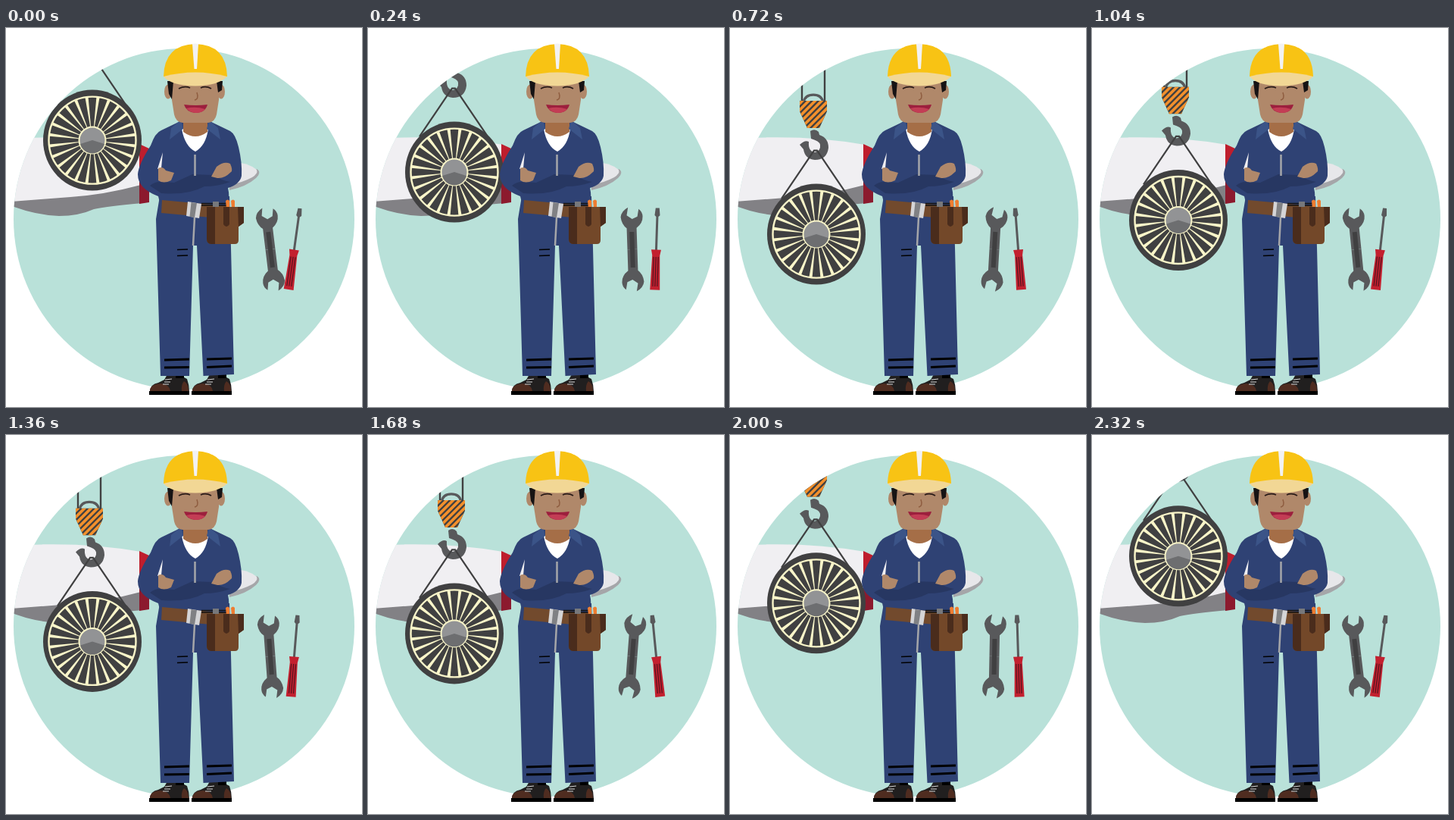
Recreate the animation shown at these times as an HTML page. Size 470 px wide and 500 px high, loop 2.4 s.

```html
<!DOCTYPE html>
<html lang="en">
<head>
<meta charset="utf-8">
<title>Aircraft mechanic</title>
<style>
html, body { margin: 0; width: 100%; height: 100%; overflow: hidden; background: #fff; }
svg { display: block; width: 100%; height: 100%; }
</style>
</head>
<body>
<svg viewBox="0 0 470 500">
  <defs>
    <clipPath id="disc"><circle cx="235" cy="252" r="225"/></clipPath>
    <clipPath id="blockShape"><path d="M92 96H128V110L118 132H102L92 110Z"/></clipPath>
    <path id="jaw" d="M-4-55.500Q-13-51-14-43Q-13-33-6.500-28V0H6.500V-28Q15-34 15-43Q15-49 10-53L8-43L1-40L-6-45Z"/>
    <g id="shoe">
      <path fill="#211f1f" d="M190 480Q190 470 201 468L209 464L213 457Q225 455 239 463Q242 471 242 480Z"/>
      <path fill="#4f2c20" d="M190 479Q190 470 204 469Q216 470 217 479ZM235 466Q241 469 241 479H232Q231 470 235 466Z"/>
      <path fill="none" stroke="#d8d8d8" d="M210 464L219 463M209 467L217 467M207 470L215 470"/>
      <path d="M189 479H242V484H189ZM224 456H235V462H224Z"/>
    </g>
  </defs>

  <circle cx="235" cy="252" r="225" fill="#b9e1d9"/>

  <g clip-path="url(#disc)">
    <!-- plane -->
    <path fill="#828185" d="M8 228L180 205V231Q135 235 116 239Q96 248 70 248Q40 247 8 235Z"/>
    <path fill="#f0eff2" d="M8 146Q100 140 178 154V207Q130 220 85 223L8 229Z"/>
    <path fill="#be1e2d" d="M176 153L189 159V195H176Z"/>
    <path fill="#8c1a2e" d="M176 190H189V230L176 232Z"/>
    <path fill="#a5a6a9" d="M295 200L331 186Q338 190 330 198Q318 209 295 214Z"/>
    <path fill="#e7e7ea" d="M295 177Q318 176 331 187Q333 192 325 197Q312 204 295 207Z"/>

    <!-- hoist and engine -->
    <g id="hoist">
      <path fill="none" stroke="#404041" stroke-width="2.4" d="M95 -200V98M125 -200V98"/>
      <path fill="none" stroke="#58595b" stroke-width="3.4" d="M97 98Q99 88 110 88Q121 88 123 98"/>
      <g clip-path="url(#blockShape)">
        <path fill="#404041" d="M90 95H130V134H90Z"/>
        <path id="stripes" stroke="#f3902c" stroke-width="3.600"/>
      </g>
      <path fill="#58595b" d="M106 136Q112 132 117 137L118 141Q130 145 130 158Q128 174 112 174Q99 173 97 160L92 154Q99 147 104 150Q103 163 112 164Q120 162 119 154Q118 149 107 146Z"/>
      <path fill="none" stroke="#404041" stroke-width="2.2" d="M68 225L111 161.500H115L158 225"/>
      <g transform="translate(114 272)">
        <ellipse rx="65" ry="66.500" fill="#404041"/>
        <circle r="57.500" fill="none" stroke="#f9f5c9" stroke-width="2.4"/>
        <path id="spokes" fill="#f9f5c9"/>
        <circle r="18.500" fill="#f9f5c9"/>
        <circle r="16.500" fill="#929395"/>
        <path fill="#6d6e70" d="M-16 5L0 0L16 5A16.500 16.500 0 0 1-16 5Z"/>
      </g>
    </g>
  </g>

  <!-- shoes and trousers -->
  <use href="#shoe"/><use href="#shoe" x="56"/>
  <path fill="#2f4274" d="M203 222H295L297 290L301 457L260.500 459L252 287H247L242 459H204L198 252Z"/>
  <path stroke="#000" stroke-width="3" d="M209 438L242 437M209 448L242 447.500M265 437L298 436M265 447.500L298 446"/>
  <path stroke="#000" stroke-width="1.5" d="M226 292.500L240 292M226 300.500L240 300"/>

  <!-- torso and arms -->
  <path fill="#2f4274" d="M230 123H269L296 136Q303 140 307 157Q312 178 311 195Q309 206 293 211Q296 224 292 230H203L201 222Q174 212 174 193Q175 180 191 155Q197 138 205 135Z"/>
  <path fill="#f0eff2" d="M207 164L200 186L205 185Z"/>
  <path fill="#273762" d="M190 208Q196 203 203 203L222 204L246 193L274 194Q284 201 296 203Q280 209 262 209Q240 221 205 218Z"/>
  <path fill="#b0886a" d="M201 185Q207 182 211 188L222 191L218 201Q208 206 201 201ZM271 196L278 183Q288 175 296 179Q300 188 297 190Q288 199 279 198Z"/>
  <path fill="#fff" d="M232 133H267Q264 155 250 163Q236 156 232 133Z"/>
  <path fill="#a56e47" d="M234 121H266V137Q250 149 234 137Z"/>
  <path fill="#3b5488" d="M231 121L234 133L216 147L218 132ZM268 121L265 133L283 147L280 132Z"/>
  <path stroke="#a5a6a9" stroke-width="2.5" d="M249.500 167V195M249 250L247 287"/>

  <!-- belt and pouch -->
  <path fill="#724a2d" d="M206 227L292 235V252L205 244Z"/>
  <path fill="#d5d5d7" d="M240 229L258 232L255 251L238 248Z"/>
  <path fill="#808184" d="M244.500 230L252 231L249 250L242.500 249Z"/>
  <path stroke="#111" stroke-width="1.5" d="M258 231.500H291M258 234H291"/>
  <path fill="#77787b" d="M273 229H281V238H273Z"/>
  <path fill="#ee7d31" d="M290 228Q293 225 295 228V238H291ZM297 228Q300 225 302 228V238H298Z"/>
  <path fill="#734829" d="M265 236H314V257L307 262V280Q307 285 302 285H271Q265 285 265 278Z"/>
  <path fill="#4a2c1c" d="M265 236H276V285H271Q265 285 265 278ZM287 236H295V259Q291 265 287 259ZM306 236H314V257L307 262Z"/>

  <!-- head -->
  <g fill="#b0886a">
    <ellipse cx="214" cy="84" rx="5" ry="9.500"/>
    <ellipse cx="284" cy="84" rx="5" ry="9.500"/>
    <path d="M218 68H282L281 95L278 114Q276 124 267 125H233Q224 124 222 114L219 95Z"/>
  </g>
  <path fill="#161314" d="M213 70H221L219 94L215 87ZM278 70H286L285 82L280 85Z"/>
  <path fill="none" stroke="#2b1c18" stroke-width="1.800" d="M228 80Q236 76 243 79M257 79Q264 76 271 80"/>
  <path fill="none" stroke="#8f5d40" stroke-width="1.500" d="M252 85Q255 94 249 95"/>
  <path fill="#9c1f3d" d="M235 101Q250 103 266 101Q263 112 250 112Q238 111 235 101Z"/>
  <path fill="#c33d55" d="M238 106Q250 103 263 107Q259 112 250 112Q242 111 238 106Z"/>
  <path fill="#f8c314" d="M208 64Q209 22 250 21Q291 22 292 64Z"/>
  <path fill="#f2f2f4" d="M246 21Q250 20 254 21L252 54H248.500Z"/>
  <path fill="#f2d795" d="M208 64Q250 53 292 64Q280 76 250 76.500Q218 76 208 64Z"/>

  <!-- tools -->
  <g id="wrench" fill="#58595b">
    <use href="#jaw"/><use href="#jaw" transform="rotate(180)"/>
    <path fill="#404041" d="M-3-23H3V24H-3Z"/>
  </g>
  <g id="driver">
    <path fill="#58595b" d="M-2.500-54.500H2.500L3.500-45L1.500-43V2H-1.500V-43L-3.500-45Z"/>
    <path fill="#c3202f" d="M-6.500 0.500H6.500L5 8L6.500 53.500H-6.500L-5 8Z"/>
    <path stroke="#5a1420" stroke-width="1.300" d="M-3 10V49M0 10V49M3 10V49"/>
  </g>
</svg>

<script>
const LOOP = 2400, BLADES = 24;
const $ = id => document.getElementById(id);

$("stripes").setAttribute("d", Array.from({ length: 11 },
  (_, i) => `M${48 + i * 8.5} 135l40-40`).join(""));

// Light gaps between the fan blades, widening from the hub to the rim.
const polar = (r, a) => `${(r * Math.sin(a)).toFixed(2)} ${(-r * Math.cos(a)).toFixed(2)}`;
$("spokes").setAttribute("d", Array.from({ length: BLADES }, (_, i) => {
  const a = (i + .5) * 2 * Math.PI / BLADES;
  return `M${polar(17, a - .025)}L${polar(57, a - .036)}L${polar(57, a + .036)}L${polar(17, a + .025)}Z`;
}).join(""));

// Engine height: [time, y, speed]
const path = [
  [0, 148, .12], [400, 222, .185], [720, 272, .08], [790, 275, 0],
  [1070, 252.8, 0], [1440, 275, 0], [1680, 262, -.1],
  [2000, 222, -.165], [2320, 160, -.17], [LOOP, 148, -.12]
];

function engineY(t) {
  const i = path.findIndex(p => p[0] > t);
  const [t0, y0, v0] = path[i - 1], [t1, y1, v1] = path[i];
  const d = t1 - t0, u = (t - t0) / d, w = 1 - u;
  return w * w * ((1 + 2 * u) * y0 + u * d * v0) + u * u * ((3 - 2 * u) * y1 - w * d * v1);
}

function draw(now) {
  const t = now % LOOP;
  const swing = Math.cos((t + 30) / 1200 * 2 * Math.PI);
  const place = (id, value) => $(id).setAttribute("transform", value);
  place("hoist", `translate(0 ${engineY(t) - 272})`);
  place("wrench", `translate(349 292) rotate(${-1 - 6 * swing})`);
  place("driver", `translate(380.5 292) rotate(${.8 + 7.2 * swing})`);
}

const start = performance.now();
function tick() {
  draw(performance.now() - start);
  requestAnimationFrame(tick);
}
tick();
</script>
</body>
</html>
```
